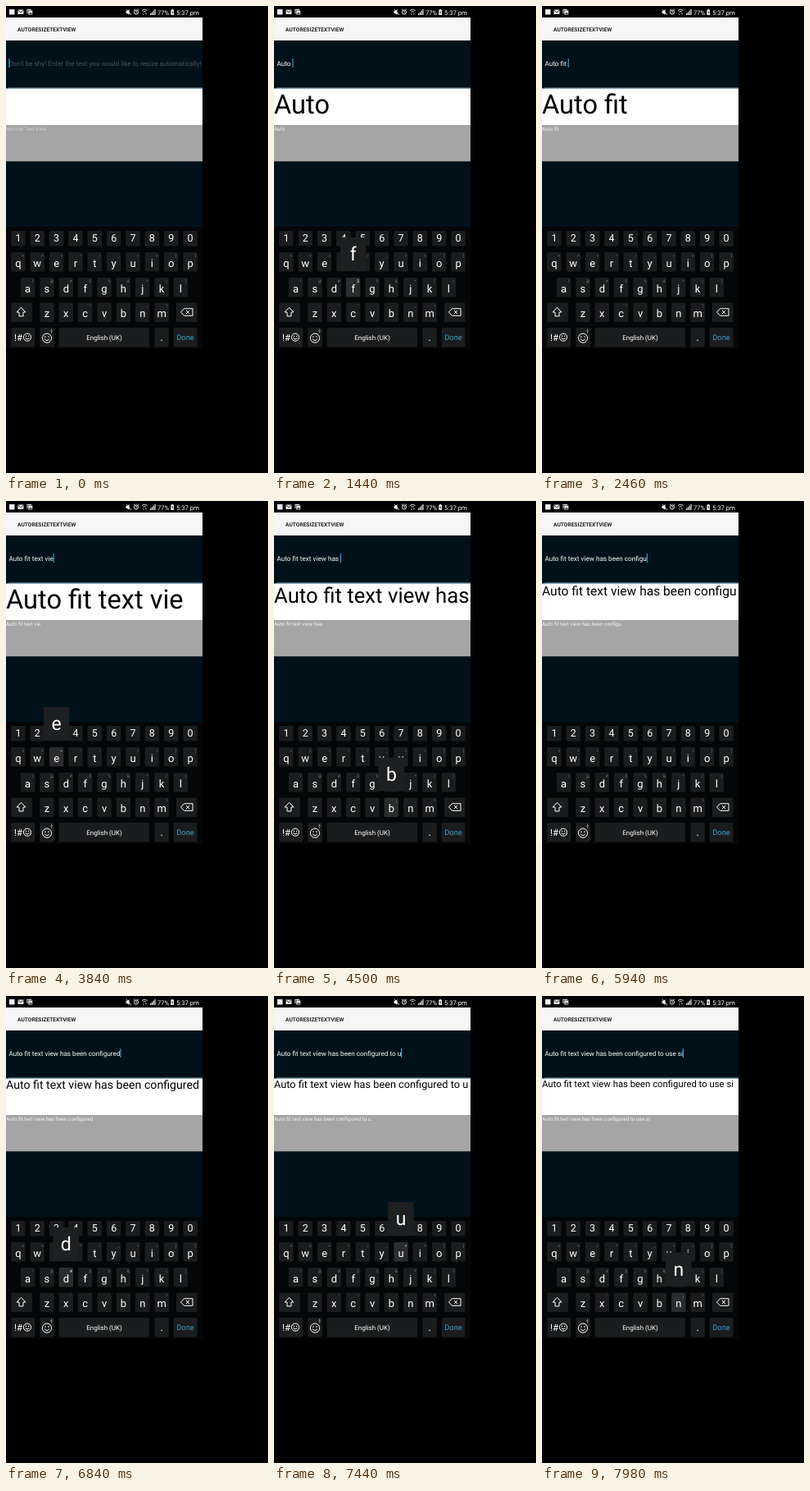
These frames come from a looping animation (320x569 px, 8000 ms). An HTML page:

```html
<!DOCTYPE html>
<html lang="en">
<head>
<meta charset="utf-8">
<title>Auto resize text view</title>
<style>
html, body { margin: 0; width: 100%; height: 100%; overflow: hidden; background: #000; }
svg { display: block; width: 100vw; height: 100vh; }
text { font-family: Roboto, "Noto Sans", sans-serif; fill: #fff; white-space: pre; text-rendering: geometricPrecision; }
.mid { text-anchor: middle; }
.line { fill: none; stroke: #fff; }
</style>
</head>
<body>
<svg id="stage" viewBox="0 0 320 569">
  <rect width="320" height="569"/>

  <!-- status bar -->
  <g fill="#eee">
    <rect x="4" y="4" width="6.5" height="6.5"/>
    <rect x="14.5" y="4.5" width="7" height="5.5"/>
    <path d="M14.5 5l3.5 2.8 3.5-2.8" fill="none" stroke="#000" stroke-width=".8"/>
    <path d="M25.5 4h5.5v1h-4.500v4h-1z"/>
    <rect x="27.300" y="5.500" width="5" height="5"/>
    <path d="M28 9.700l1.500-2 1 1 .700-.7.800 1.700z" fill="#222"/>
    <path d="M146.500 6h1.500l2.500-2v7l-2.500-2h-1.500z"/>
    <path class="line" d="M147 4l6 7" stroke-width=".9"/>
    <circle class="line" cx="159" cy="7.500" r="2.600" stroke-width="1"/>
    <path class="line" d="M159 6v1.700h1.300M156 5l1.500-1.300M162 5l-1.500-1.300" stroke-width=".8"/>
    <path class="line" d="M166 5.500q3.300-2.600 6.600 0M167.500 7.300q1.800-1.400 3.600 0" stroke-width=".9"/>
    <path d="M167 10.500l1-1.500 1 1.500zM170 9h2l-1 1.500z"/>
    <path d="M176 9h1.200v2H176zM177.800 7.500h1.200V11h-1.200zM179.600 5.800h1.200V11h-1.200zM181.400 4h1.200v7h-1.200z"/>
    <path d="M201.300 4.800h1V4h1.800v.8h1V11h-3.800z"/>
    <path d="M203.500 5.700l-1.200 2.400h.9l-.3 2 1.300-2.600h-.9z" fill="#000"/>
  </g>
  <text x="185" y="10.500" font-size="7.600">77%</text>
  <text x="208" y="10.500" font-size="7.700">5:37 pm</text>

  <!-- app -->
  <rect y="14" width="240" height="28" fill="#f6f6f6"/>
  <text x="14" y="30.700" font-size="6.650" font-weight="700" style="fill:#222">AUTORESIZETEXTVIEW</text>
  <rect y="42" width="240" height="227" fill="#00111a"/>
  <rect y="100.500" width="240" height="44.500" fill="#fff"/>
  <rect x="3" y="99.600" width="237" height="1" fill="#8fbdd8"/>
  <rect y="145" width="240" height="44.300" fill="#a6a5a6"/>
  <text id="edit" x="3.500" y="72.600" font-size="8.170"></text>
  <rect id="cursor" y="64" width="1.100" height="11" fill="#3aa9dc"/>
  <text id="big" x="0" style="fill:#000"></text>
  <text id="small" x="0" y="151.900" font-size="6.390"></text>

  <!-- keyboard -->
  <rect y="269" width="240" height="149" fill="#050607"/>
  <g id="keys"></g>
  <g class="line" stroke-width="1">
    <path d="M18.500 367.500l-5.500 5.500h3v5h5v-5h3z"/>
    <path d="M213.500 373l4-4.300h10.500v8.600h-10.500zM220 371l4 4M224 371l-4 4"/>
    <circle cx="26" cy="403.600" r="4.600"/>
    <path d="M23.500 404.500q2.500 3 5 0"/>
    <circle cx="50" cy="404.600" r="5.600"/>
    <path d="M47 405.700q3 3.500 6 0"/>
  </g>
  <g fill="#fff">
    <circle cx="24.400" cy="402.300" r=".7"/><circle cx="27.600" cy="402.300" r=".7"/>
    <circle cx="48" cy="403" r=".8"/><circle cx="52" cy="403" r=".8"/>
  </g>
  <path d="M55.500 393.500v2.500M54 395.500q1.500 2.500 3 0M55.500 397v1.500" fill="none" stroke="#999" stroke-width=".8"/>
  <g id="popup">
    <rect width="31.500" height="41" rx="1.500" fill="#1e1f20"/>
    <text id="popLetter" class="mid" x="15.750" y="28" font-size="23"></text>
  </g>
</svg>
<script>
const LOOP = 8000, TICK = 60;
const MESSAGE = "Auto fit text view has been configured to use sin";
const HINT = "Don't be shy! Enter the text you would like to resize automatically!";
// Tick at which each character is entered
const TYPED = [
  8, 10, 13, 16, 18, 25, 28, 31, 37, 47, 49, 51, 53, 54, 61, 62, 64, 66, 68,
  70, 72, 73, 74, 76, 77, 79, 80, 81, 82, 83, 84, 86, 89, 93, 97, 101, 104, 114, 117,
  118, 120, 122, 124, 126, 128, 129, 131, 132, 134
];
const KEY = "#1b1c1d", KEY_DOWN = "#2b2c2d", SYMBOL = "#777";
const STEP = 0.2834, MAX_STEPS = 115, VIEW_WIDTH = 240;

const $ = id => document.getElementById(id);
const [edit, cursor, big, small, keys, popup, popLetter] =
  ["edit", "cursor", "big", "small", "keys", "popup", "popLetter"].map($);

function add(tag, attrs, label = "") {
  const node = document.createElementNS("http://www.w3.org/2000/svg", tag);
  for (const name in attrs) node.setAttribute(name, attrs[name]);
  node.textContent = label;
  return keys.appendChild(node);
}

const box = (x, y, width, height) => add("rect", { x, y, width, height, rx: 1.5, fill: KEY });
const label = (x, y, size, str) => add("text", { x, y, "font-size": size, class: "mid" }, str);

const letters = {};
function addRow(chars, symbols, x0, y) {
  [...chars].forEach((char, i) => {
    const x = x0 + i * 23.35;
    const rect = box(x - 8.7, y, 17.4, 23.5);
    const text = label(x, y + 17.6, 13, char);
    const symbol = label(x + 6, y + 5.6, 5, symbols[i]);
    symbol.style.fill = SYMBOL;
    letters[char] = { x, y, rect, text, symbol };
  });
}

[..."1234567890"].forEach((digit, i) => {
  const x = 14.9 + i * 23.35;
  box(x - 8.7, 274, 17.4, 18.5);
  label(x, 287.4, 12.5, digit);
});
addRow("qwertyuiop", "+×÷=/_<>[]", 14.9, 300);
addRow("asdfghjkl", "!@#$%&*()", 26.6, 331);
addRow("zxcvbnm", "-'\":;,?", 50, 361.5);
box(6.3, 361.5, 25.5, 23.5);
box(208, 361.5, 25.5, 23.5);
[[6.3, 29], [41.3, 17.5], [64.5, 110.5], [181.3, 17.5], [204.7, 28.8]]
  .forEach(([x, width]) => box(x, 392, width, 23.5));
label(15, 407.7, 11.5, "!#");
label(120, 406.7, 8, "English (UK)");
label(190, 408, 14, ".");
label(219, 407.2, 9.3, "Done").style.fill = "#3b9fcb";

function fitSize(str) {
  big.textContent = str.trimEnd();
  big.setAttribute("font-size", 100);
  const unit = big.getComputedTextLength() / 100;
  const steps = unit ? Math.floor(VIEW_WIDTH / (unit * STEP)) : MAX_STEPS;
  return Math.min(MAX_STEPS, steps) * STEP;
}

function showText(str) {
  edit.textContent = str;
  cursor.setAttribute("x", 3.4 + (str ? edit.getComputedTextLength() : 0));
  edit.textContent = str || HINT;
  edit.style.fill = str ? "#fff" : "#46565e";
  small.textContent = str || "Normal Text View";
  small.style.fill = str ? "#f4f4f4" : "#d0d0d0";
  const size = fitSize(str);
  big.setAttribute("font-size", size);
  big.setAttribute("y", 100 + size * 0.95);
}

function showKeys(pressed, upper) {
  for (const char in letters) {
    const { x, y, rect, text, symbol } = letters[char];
    const down = char === pressed;
    const shown = upper ? char.toUpperCase() : char;
    text.textContent = shown;
    rect.setAttribute("fill", down ? KEY_DOWN : KEY);
    symbol.style.fill = down ? "#fff" : SYMBOL;
    if (down) {
      popLetter.textContent = shown;
      popup.setAttribute("transform", `translate(${x - 15.75} ${y - 49})`);
    }
  }
  popup.style.display = letters[pressed] ? "" : "none";
}

let shownState = "";
function frame() {
  const tick = Math.floor(performance.now() % LOOP / TICK);
  const count = TYPED.filter(t => t <= tick).length;
  const active = TYPED.findLastIndex(t => tick >= t - 1 && tick <= t + 1);
  const pressed = active < 0 ? "" : MESSAGE[active].toLowerCase();
  const upper = tick >= 1 && tick < 10 && active <= 0;
  const state = [count, active, upper].join();
  if (state !== shownState) {
    shownState = state;
    showText(MESSAGE.slice(0, count));
    showKeys(pressed, upper);
  }
  requestAnimationFrame(frame);
}
frame();
</script>
</body>
</html>
```
